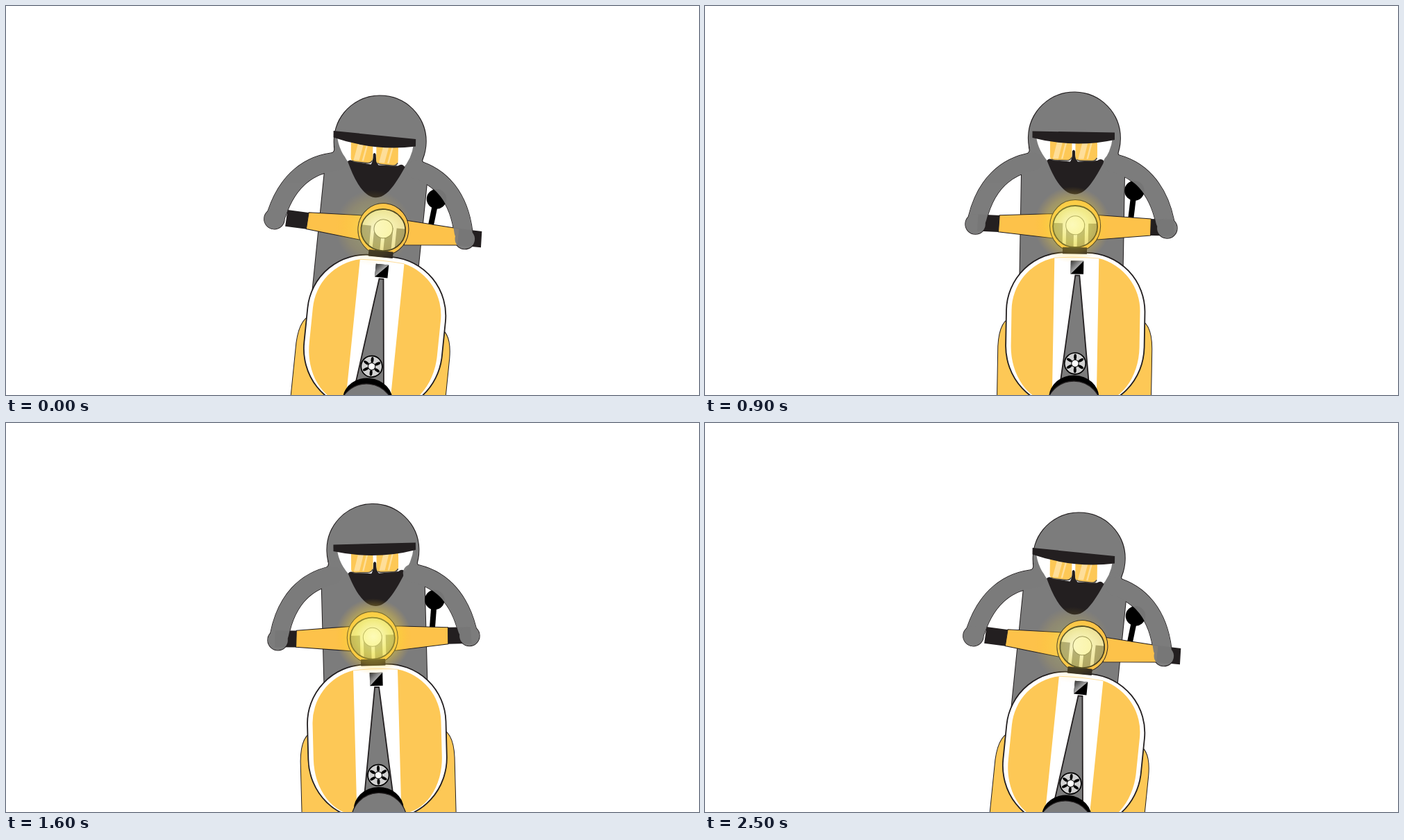
Recreate the animation shown at these times as an HTML page. Size 998x561 px, loop 2550 ms.

```html
<!DOCTYPE html>
<html lang="en">
<head>
<meta charset="utf-8">
<title>Scooter rider</title>
<style>
  html, body { margin: 0; width: 100%; height: 100%; overflow: hidden; background: #fff; }
  svg { display: block; width: 100%; height: 100%; }
  .yellow { fill: #fdc856; }
  .amber { fill: #fdc24a; stroke: #231f20; }
  .dark { fill: #231f20; }
  .edge { --tone: #231f20; --arm: 27.8px; fill: var(--tone); stroke: var(--tone); stroke-width: 2; }
  .skin { --tone: #7c7c7c; --arm: 26px; fill: var(--tone); }
  .arm { fill: none; stroke: var(--tone); stroke-width: var(--arm); stroke-linecap: round; }
</style>
</head>
<body>
<svg viewBox="0 0 998 561">
  <defs>
    <radialGradient id="glow">
      <stop offset="0" stop-color="#ffffa8" stop-opacity=".65"/>
      <stop offset=".45" stop-color="#f5ef4c" stop-opacity=".7"/>
      <stop offset=".72" stop-color="#fad532" stop-opacity=".5"/>
      <stop offset="1" stop-color="#fcc02e" stop-opacity="0"/>
    </radialGradient>
    <radialGradient id="glass">
      <stop offset="0" stop-color="#fffde2"/>
      <stop offset="1" stop-color="#e6dd9a"/>
    </radialGradient>
    <linearGradient id="badge" x2="1" y2="1">
      <stop offset="0" stop-color="#333"/>
      <stop offset=".5" stop-color="#aaa"/>
    </linearGradient>
    <clipPath id="lens"><ellipse cx="531" cy="315.5" rx="32" ry="30"/></clipPath>
    <g id="arms">
      <path class="arm" d="M472 223C432 230 404 258 393 306"/>
      <path class="arm" d="M586 223C624 230 652 258 663 306"/>
      <circle cx="390.3" cy="314.5" r="14.3"/>
      <circle cx="666.2" cy="315.5" r="14.3"/>
    </g>
    <g id="torso">
      <circle cx="530.5" cy="188" r="66"/>
      <path d="M466 203Q468 209 463 212L455.5 238V425H603.5V238L595 212Q592 209 594 203Z"/>
    </g>
    <g id="shade">
      <path class="yellow" d="M497 186H528.5V214Q527.5 220.5 521 220.5H503Q497 220 497 215Z"/>
      <path d="M508 190h8l-7 28h-8zM520 190h2.500l-7 28h-2.500z" fill="#fee2a4" opacity=".85"/>
      <path d="M499 219Q501 220.5 504 220.5H521Q526 220.5 528 216" fill="none" stroke="#4d4a45" stroke-width="1.5"/>
    </g>
  </defs>

  <g id="scene">
    <g class="rider">
      <g class="edge"><use href="#torso"/><use href="#arms"/></g>
      <g class="skin"><use href="#torso"/><use href="#arms"/></g>
    </g>

    <g id="face">
      <path d="M477 186Q479 207 497 226H570Q585 208 587 186Z" fill="#fff"/>
      <path class="dark" d="M492.5 221Q496 217 501 220L526 222Q529 218 529 207Q531 203 533 207Q533 218 537 222L565 220Q571 215 575 221C560 250 548 269 532.5 269C516 269 503 248 492.5 221Z"/>
      <use href="#shade"/><use href="#shade" x="36.5"/>
      <path class="dark" d="M471.5 179H590V189.5Q531 203 471.5 188.5Z"/>
    </g>

    <g class="front">
      <path class="yellow" stroke="#231f20" d="M422.7 620V490Q424 450 445 447H622Q644 450 644.7 490V620Z"/>
      <path d="M519 353H548.5A85 85 0 0 1 633.5 438V488A85 88 0 0 1 548.5 576H519A85 88 0 0 1 434 488V438A85 85 0 0 1 519 353Z" fill="#fff" stroke="#231f20" stroke-width="1.8"/>
      <path class="yellow" d="M502 361V569A60.5 81 0 0 1 441.5 488V438A78 78 0 0 1 502 361ZM566 361V569A60.5 81 0 0 0 626.5 488V438A78 78 0 0 0 566 361Z"/>
      <path d="M502 361Q534 358.5 566 361" fill="none" stroke="#fddc9a"/>
      <path d="M525.6 365h18.500v19h-18.500z"/>
      <path d="M525.6 365h18.500l-18.500 19z" fill="url(#badge)"/>
      <path d="M532.4 386H538.4L555 545H513Z" fill="#7c7c7c" stroke="#231f20" stroke-width="1.8"/>
      <ellipse cx="533.5" cy="562" rx="36" ry="32"/>
      <circle cx="533.5" cy="578.5" r="40" fill="#7c7c7c" stroke="#231f20" stroke-width="1.3"/>
      <g id="fan" transform="translate(534.3 513)">
        <circle r="15.3" fill="#d2d2d2" stroke="#000" stroke-width="1.7"/>
        <circle r="5.2" fill="#fff" stroke="#000"/>
      </g>
    </g>

    <g id="mirror">
      <path d="M617.5 264L613 308" stroke="#000" stroke-width="8"/>
      <circle cx="618" cy="262.3" r="14.3"/>
    </g>

    <g class="front">
      <path class="dark" d="M391 300.5L423 301.5L421 325.5L390 324.5ZM639 302.6L672.5 303L673.5 326.5L639 326.6Z"/>
      <path class="amber" d="M421.8 301.2L500 297.5V333L420.5 325.3ZM563 298.5L640 302.6L639.7 326.6L563 334Z"/>
      <path class="dark" d="M513.5 340h35v15h-35z"/>
      <ellipse class="amber" cx="531" cy="314.5" rx="36.5" ry="37.5"/>
      <path class="dark" d="M513.5 345.5h35v9h-35z"/>
      <g clip-path="url(#lens)">
        <path d="M495 280h75v70h-75z" fill="url(#glass)"/>
        <path d="M495 311h18v40h-18zM518 311h11v40h-11zM534 311h11v40h-11zM550 311h20v40h-20z" fill="#8b8556" opacity=".75"/>
      </g>
      <ellipse cx="531" cy="315.5" rx="32" ry="30" fill="none" stroke="#38351f" stroke-width="1.8"/>
      <circle cx="531" cy="313.8" r="13.5" fill="#fbf6c4" stroke="#8b8556"/>
    </g>

    <circle id="light" cx="529" cy="313" r="55" fill="url(#glow)"/>
    <g class="rider skin" opacity=".95"><use href="#arms"/></g>
  </g>
</svg>
<script>
  const LOOP = 2550, STEP = 50;
  // time, tilt in degrees, vertical offset
  const KEYS = [
    [0, 5.8, 7], [275, 0.8, 1.2], [550, -4.8, -5], [640, -5.1, -7],
    [900, 1, 2.5], [1110, 4.5, 7.2], [1200, 4, 8], [1600, -1.5, -5],
    [1800, -4.6, -12], [2100, 1.75, 0], [2200, 4.3, 2.3], [2500, 5.8, 7], [LOOP, 5.8, 7]
  ];
  const $ = id => document.getElementById(id);
  const setAll = (selector, value) =>
    document.querySelectorAll(selector).forEach(el => el.setAttribute('transform', value));

  for (let i = 0; i < 6; i++) {
    $('fan').insertAdjacentHTML('beforeend',
      `<ellipse cy="-9.5" rx="2" ry="4.3" transform="rotate(${i * 60})"/>`);
  }

  // Slope at a key: flat at turning points, otherwise the slope between neighbours.
  function slope(i, c) {
    const a = KEYS[i - 1], b = KEYS[i], d = KEYS[i + 1];
    if (!a || !d || (b[c] - a[c]) * (d[c] - b[c]) <= 0) return 0;
    return (d[c] - a[c]) / (d[0] - a[0]);
  }

  function curve(t, c) {
    const i = KEYS.findIndex((k, n) => n && t < k[0]);
    const a = KEYS[i - 1], b = KEYS[i], span = b[0] - a[0];
    const u = (t - a[0]) / span, v = 1 - u;
    return a[c] * (1 + 2 * u) * v * v + b[c] * u * u * (3 - 2 * u)
      + span * u * v * (slope(i - 1, c) * v - slope(i, c) * u);
  }

  function draw(now) {
    const t = Math.floor(now % LOOP / STEP) * STEP;
    const tilt = curve(t, 1), skew = Math.tan(tilt * Math.PI / 180);
    setAll('#scene', `translate(0 ${curve(t, 2)})`);
    setAll('.rider', `rotate(${tilt} 530 269)`);
    setAll('.front', `rotate(${tilt} 532 437)`);
    setAll('#mirror', `rotate(${tilt} 530 287)`);
    setAll('#face', `translate(531 190) matrix(1 ${skew} ${-0.15 * skew} 1 0 0) translate(-531 -190)`);
    $('light').setAttribute('opacity', 0.62 - 0.06 * tilt);
  }

  const start = performance.now();
  (function tick() {
    draw(performance.now() - start);
    requestAnimationFrame(tick);
  })();
</script>
</body>
</html>
```
